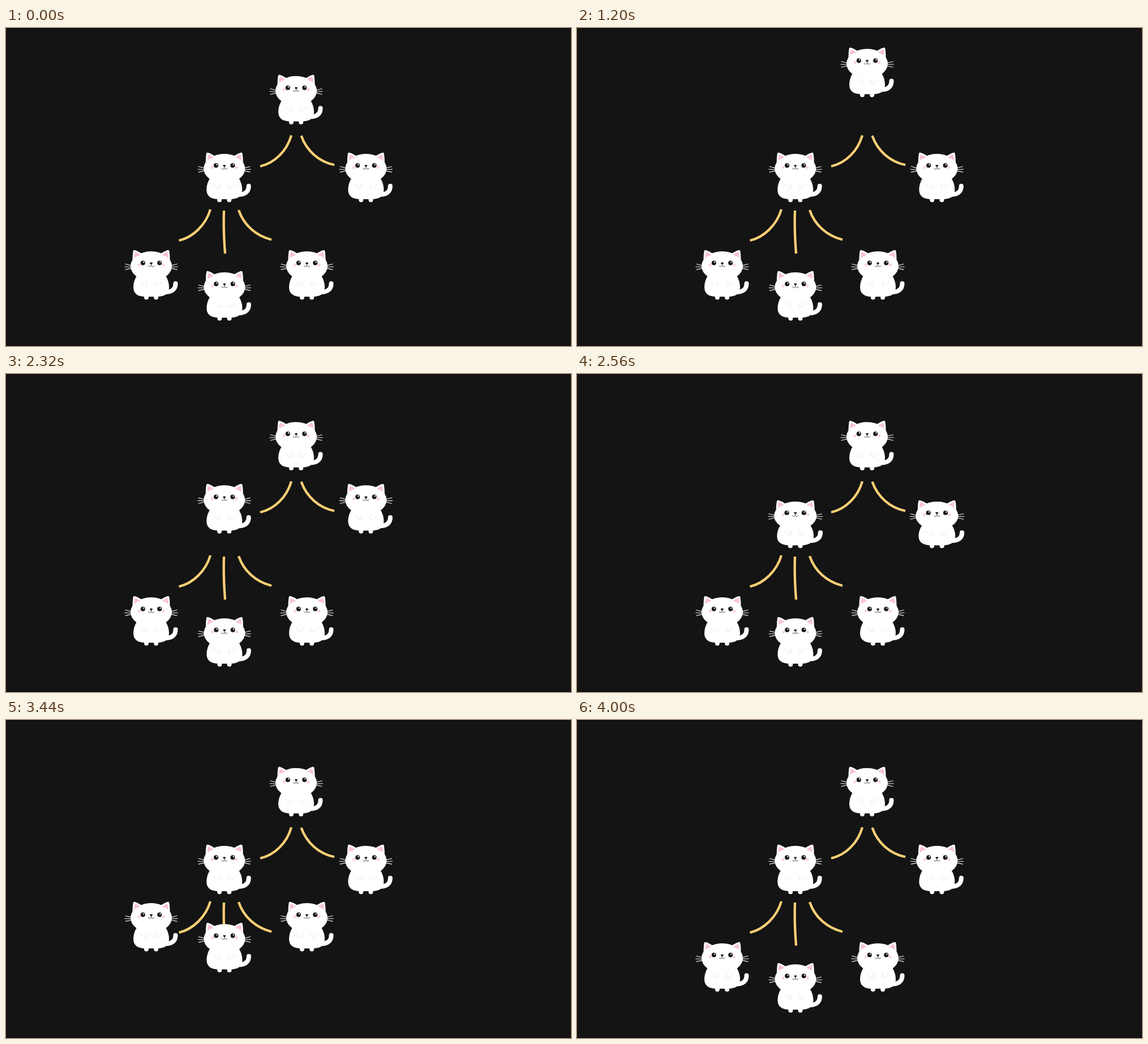
Animation, 998 px wide and 561 px high, one loop 4.48 s. Source, as an HTML page:

```html
<!DOCTYPE html>
<html lang="en">
<head>
<meta charset="utf-8">
<title>Bouncing cat tree</title>
<style>
  html, body { margin: 0; width: 100%; height: 100%; overflow: hidden; background: #141414; }
  svg { display: block; width: 100vw; height: 100vh; }
</style>
</head>
<body>
<svg viewBox="0 0 998 561">
  <defs>
    <!-- half of the mirrored parts; origin is the middle of the soles -->
    <g id="back">
      <path d="M-33-69C-33-75-32.800-81-31.800-86Q-31-88-28.600-87.300C-24-86-19.500-83.500-15-79.500Z" fill="#fff"/>
      <path d="M-46-63L-34-59.800M-47.200-58L-34-57.500M-46-52.800L-34-55.600" stroke="#eee" stroke-width="1.100"/>
    </g>
    <g id="front">
      <path d="M-29.800-73.500C-30-78-29.600-81-28.800-83.300Q-28-84.300-26.500-83.500C-23.500-82-21.500-80.500-19.500-78.500Q-26.500-77-29.800-73.500Z" fill="#f9c3d0"/>
      <circle cx="-14.700" cy="-64.600" r="4" fill="#171717"/>
      <circle cx="-21.300" cy="-61.200" r="2.600" fill="#fad3dc"/>
      <path d="M0-60.500Q-.8-58-3-58-4.800-58.200-5-60.200" fill="none" stroke="#333" stroke-width=".8"/>
      <path d="M-19-32C-16-27-12-23.800-9-24.200-5.500-25-6.500-29-10-32.500" fill="none" stroke="#dedede" stroke-width=".8"/>
    </g>
    <g id="cat">
      <use href="#back"/>
      <use href="#back" transform="scale(-1 1)"/>
      <path d="M24-13.500C37-13 43-19 43-28.500" fill="none" stroke="#fff" stroke-width="8" stroke-linecap="round"/>
      <ellipse cy="-59.200" rx="36.500" ry="26" fill="#fff"/>
      <path d="M-25-43H25C29.500-36 31.500-29 31.500-22 31.500-10 23-5.200 10-5.200H-10C-23-5.200-31.500-10-31.500-22-31.500-29-29.500-36-25-43Z" fill="#fff"/>
      <path d="M-8.600-8V-4M8.600-8V-4" stroke="#fff" stroke-width="8" stroke-linecap="round"/>
      <use href="#front"/>
      <use href="#front" transform="scale(-1 1)"/>
      <path d="M-2.600-65.200Q0-66.200 2.600-65.200 2-62.300 0-62-2-62.300-2.600-65.200ZM-.4-63h.8v3h-.8Z" fill="#171717"/>
      <circle cx="-13.400" cy="-66.100" r="1.200" fill="#fff"/>
      <circle cx="16" cy="-66.100" r="1.200" fill="#fff"/>
    </g>
  </defs>
  <rect width="998" height="561" fill="#141414"/>
  <path d="M0 .5H998M0 560.500H998" stroke="#050505"/>
  <path fill="none" stroke="#fdcf75" stroke-width="4.300" d="M504 189.300C496 217 475 238 449 244M521.500 190C531 217 553 236 580 241.500M361 320C353 347 331 369 305.500 375M385 322C384 348 385 373 387 398M411 321.300C420 348 442 367 469 373.500"/>
  <g id="cats"></g>
</svg>
<script>
const LOOP = 4480, STEP = 80;
const rows = [
  { start: 1165, cats: [[512.5, 170]] },
  { start: 2303, cats: [[385.7, 307.2], [635.8, 307.2]] },
  { start: 3378, cats: [[256.5, 479.2], [385.9, 516.2], [531.5, 479.2]] }
];
// each hop: take-off, landing, end of squash, height, squash depth
const hops = [[0, 200, 310, 83, .036], [310, 460, 615, 39, .03]];

const layer = document.getElementById("cats");
for (const row of rows) {
  row.nodes = row.cats.map(() => {
    const node = document.createElementNS("http://www.w3.org/2000/svg", "use");
    node.setAttribute("href", "#cat");
    return layer.appendChild(node);
  });
}

function pose(t) {
  for (const [up, down, end, height, depth] of hops) {
    if (t < up || t >= end) continue;
    if (t < down) {
      const p = (t - up) / (down - up);
      return { lift: 4 * height * p * (1 - p), squash: 0 };
    }
    return { lift: 0, squash: depth * Math.sin(Math.PI * (t - down) / (end - down)) };
  }
  return { lift: 0, squash: 0 };
}

function draw(now) {
  const t = Math.floor(now % LOOP / STEP) * STEP;
  for (const row of rows) {
    const { lift, squash } = pose(t - row.start);
    row.nodes.forEach((node, i) => {
      const [x, y] = row.cats[i];
      node.setAttribute("transform",
        `translate(${x} ${y - lift}) scale(${1 + squash * .8} ${1 - squash})`);
    });
  }
  requestAnimationFrame(draw);
}
draw(performance.now());
</script>
</body>
</html>
```
